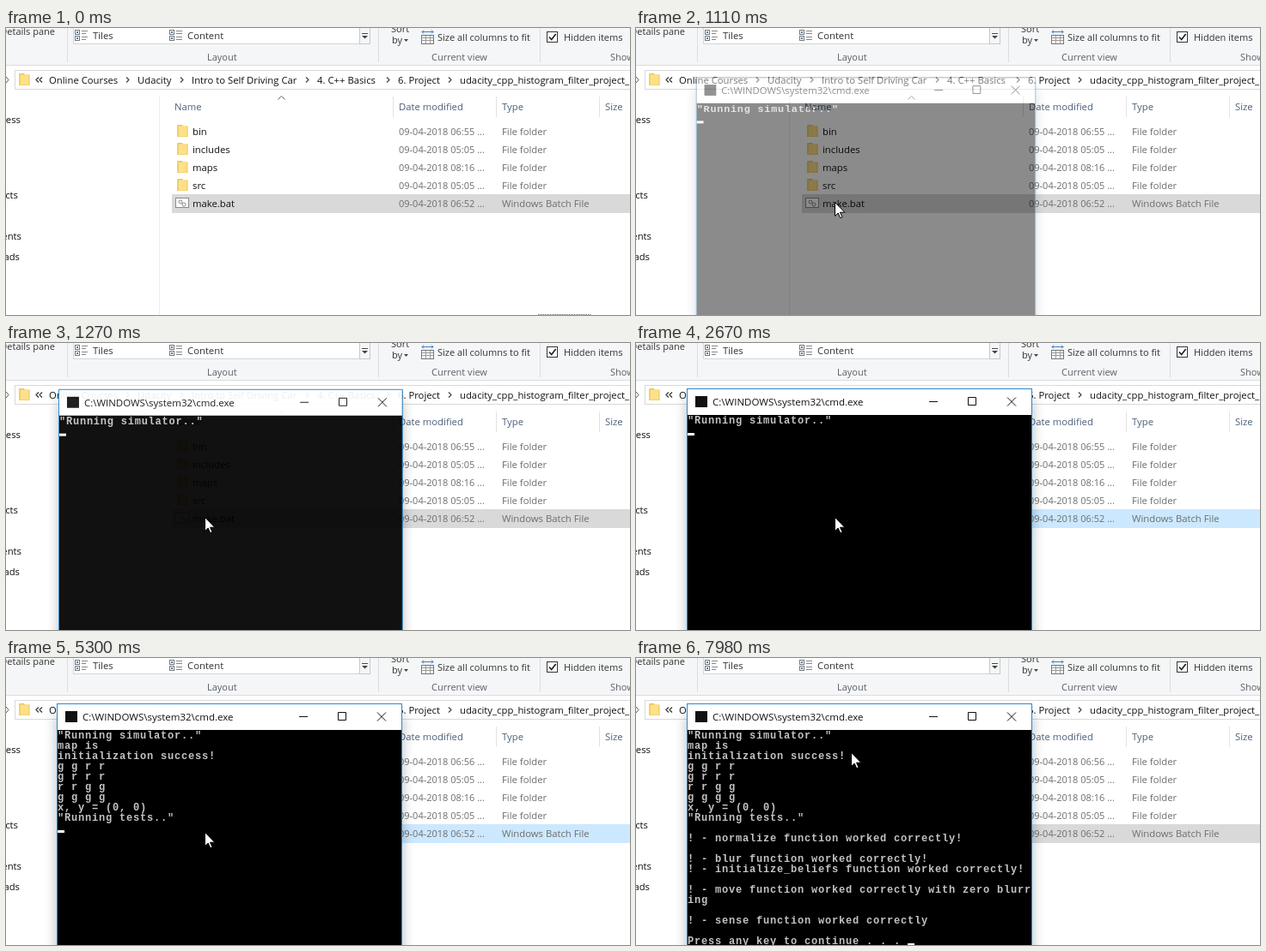
Recreate the animation shown at these times as an HTML page. Size 726 px wide and 335 px high, loop 8000 ms.

```html
<!DOCTYPE html>
<html lang="en">
<head>
<meta charset="utf-8">
<title>Batch run</title>
<style>
html, body { margin: 0; width: 100%; height: 100%; overflow: hidden; background: #fff; }
svg { display: block; width: 726px; height: 335px; }
text { font: 11.3px "Open Sans", "Noto Sans", sans-serif; white-space: pre; }
.ribbon { font-size: 11px; }
.date { font-size: 11px; }
.title { font-size: 11.5px; }
.con { font: bold 12px "Liberation Mono", "DejaVu Sans Mono", monospace; letter-spacing: .8px; fill: #c4c4c4; }
</style>
</head>
<body>
<svg id="stage" viewBox="0 0 726 335" xmlns="http://www.w3.org/2000/svg">
  <defs>
    <filter id="soft" x="-20%" y="-20%" width="140%" height="140%"><feGaussianBlur stdDeviation="7"/></filter>
    <g id="folder">
      <path d="M0 1h6l1 1.5h5.5V15H0z" fill="#e8c456"/>
      <path d="M1 2.5h10.5V14.5H1z" fill="#fde08a"/>
      <path d="M0 1h2v14H0z" fill="#f3cf63"/>
    </g>
  </defs>
  <rect width="726" height="335" fill="#fff"/>
  <g id="explorer"></g>
  <path id="ghost" d="M619 334.5h61" stroke="#555" stroke-dasharray="1 1" fill="none"/>
  <g id="win"></g>
  <path id="mouse" d="M.5.5V16.5L4.2 13 6.7 18.7 9 17.7 6.5 12.2H11.8Z" fill="#fff" stroke="#000" stroke-width="1"/>
</svg>
<script>
const NS = 'http://www.w3.org/2000/svg';
const LOOP = 8000;
const $ = id => document.getElementById(id);
const explorer = $('explorer'), win = $('win');

function add(parent, tag, attrs, content) {
  const el = document.createElementNS(NS, tag);
  for (const k in attrs) el.setAttribute(k, attrs[k]);
  if (content !== undefined) el.textContent = content;
  parent.appendChild(el);
  return el;
}
const text = (parent, x, y, str, fill = '#111', cls = '', anchor = 'start') =>
  add(parent, 'text', { x, y, fill, class: cls, 'text-anchor': anchor }, str);
const rect = (parent, x, y, width, height, fill, stroke = 'none') =>
  add(parent, 'rect', { x, y, width, height, fill, stroke });
const line = (parent, d, stroke, width = 1) =>
  add(parent, 'path', { d, stroke, 'stroke-width': width, fill: 'none' });
const folder = (x, y) => add(explorer, 'use', { href: '#folder', x, y });

function drawRibbon() {
  const g = explorer, ink = '#333', label = '#5a5f66';
  rect(g, 0, 0, 726, 43, '#f5f6f7');
  line(g, 'M0 43.5H726', '#dadbdc');
  line(g, 'M71.5 0V40M433.5 0V40M621.5 0V40', '#dcdddf');
  rect(g, 78.5, -2.5, 345, 21, '#fff', '#d3d5d8');
  rect(g, 411.5, -2.5, 12, 21, '#f5f6f7', '#c6c8cb');
  line(g, 'M414 6.5h7', '#444');
  add(g, 'path', { d: 'M414 9h7l-3.5 3.5z', fill: '#444' });

  for (const y of [3, 10]) {
    rect(g, 80.5, y - .5, 5, 5, '#fff', '#777');
    rect(g, 82, y + 1, 2, 2, '#3d7fc1');
    line(g, `M88 ${y + .5}h7M88 ${y + 3.5}h5`, '#888');
    rect(g, 190.5, y - .5, 5, 5, '#fff', '#777');
    rect(g, 192, y + 1, 2, 2, '#3d7fc1');
    line(g, `M198 ${y + .5}h7M198 ${y + 3.5}h7`, '#888');
  }
  text(g, 57, 8, 'Details pane', ink, 'ribbon', 'end');
  text(g, 101, 13, 'Tiles', ink);
  text(g, 211, 13, 'Content', ink);
  text(g, 234, 38, 'Layout', label, 'ribbon');
  text(g, 448, 5, 'Sort', ink, 'ribbon');
  text(g, 449, 18, 'by', ink, 'ribbon');
  add(g, 'path', { d: 'M463 13h5l-2.5 3z', fill: '#444' });

  rect(g, 483.5, 8.5, 14, 10, '#fff', '#777');
  line(g, 'M488.5 9v9M493.5 9v9M484 11.5h13M484 14.5h13', '#999');
  line(g, 'M484 4.5h13M486 2.5l-2 2 2 2M495 2.5l2 2-2 2', '#3d7fc1');
  text(g, 502, 15, 'Size all columns to fit', ink, 'ribbon');
  text(g, 495, 38, 'Current view', label, 'ribbon');

  rect(g, 629.5, 4.5, 12, 12, '#fff', '#333');
  line(g, 'M632 10.5l2.7 3 5-6.5', '#222', 1.7);
  text(g, 649, 15, 'Hidden items', ink, 'ribbon');
  text(g, 703, 38, 'Show/hide', label, 'ribbon');
}

function drawAddress() {
  rect(explorer, 10.5, 49.5, 740, 22, '#fff', '#d9d9d9');
  line(explorer, 'M0 57l3 3.5-3 3.5', '#555');
  folder(15, 52);
  line(explorer, 'M38 57.5l-3 3 3 3M42 57.5l-3 3 3 3', '#333', 1.2);
  const path = [[50, 'Online Courses'], [153, 'Udacity'], [216, 'Intro to Self Driving Car'],
    [362, '4. C++ Basics'], [456, '6. Project'], [528, 'udacity_cpp_histogram_filter_project_master']];
  path.forEach(([x, name], i) => {
    text(explorer, x, 65, name);
    if (i) line(explorer, `M${x - 13} 57.5l3 3-3 3`, '#444', 1.2);
  });
}

function drawSide() {
  line(explorer, 'M178.5 80V335', '#ececec');
  [[17, 111, 'Quick access'], [14, 199, '3D Objects'], [18, 247, 'Documents'], [16, 271, 'Downloads']]
    .forEach(([x, y, s]) => text(explorer, x, y, s, '#111', '', 'end'));
}

function drawList() {
  const head = '#4c607a';
  line(explorer, 'M316.5 83.5l4-4 4 4', '#666');
  line(explorer, 'M450.5 80V104M570.5 80V104M690.5 80V104', '#e2e2e2');
  [[196, 'Name'], [457, 'Date modified'], [577, 'Type'], [697, 'Size']]
    .forEach(([x, s]) => text(explorer, x, 96, s, head));
  const row = rect(explorer, 193, 194, 533, 22, '#d9d9d9');
  const files = [['bin', '06:55'], ['includes', '05:05'], ['maps', '08:16'], ['src', '05:05'], ['make.bat', '06:52']];
  const dates = files.map(([name, time], i) => {
    const y = 125 + 21 * i, batch = i === 4;
    if (!batch) folder(199, y - 13);
    text(explorer, 217, y, name);
    text(explorer, 577, y, batch ? 'Windows Batch File' : 'File folder', '#6d6d6d');
    return text(explorer, 457, y, `09-04-2018 ${time} ...`, '#6d6d6d', 'date');
  });
  rect(explorer, 197.5, 198.5, 15, 11, '#fff', '#8a8a8a');
  for (const [x, y] of [[203, 203], [207, 206]])
    add(explorer, 'circle', { cx: x, cy: y, r: 2, fill: 'none', stroke: '#888' });
  return { row, date: dates[0] };
}

function drawConsole() {
  add(win, 'rect', { x: 58, y: 66, width: 404, height: 400, fill: '#000', opacity: .25, filter: 'url(#soft)' });
  rect(win, 59.5, 53.5, 401, 420, '#000', '#2b8ad0');
  rect(win, 60, 54, 400, 30, '#fff');
  rect(win, 69, 62, 14, 13, '#111');
  text(win, 89, 73, 'C:\\WINDOWS\\system32\\cmd.exe', '#111', 'title');
  line(win, 'M341 68.5h10M386.5 63.5h9v9h-9zM432 63.5l10 10M442 63.5l-10 10', '#111');
  const group = (start, lines) => {
    const g = add(win, 'g', {});
    lines.forEach((s, i) => s && text(g, 60, 94 + 12 * (start + i), s, '#c4c4c4', 'con'));
    return g;
  };
  group(0, ['"Running simulator.."']);
  const sim = group(1, ['map is', 'initialization success!', 'g g r r', 'g r r r', 'r r g g',
    'g g g g', 'x, y = (0, 0)', '"Running tests.."']);
  const tests = group(10, ['! - normalize function worked correctly!', '',
    '! - blur function worked correctly!', '! - initialize_beliefs function worked correctly!', '',
    '! - move function worked correctly with zero blurr', 'ing', '',
    '! - sense function worked correctly', '', 'Press any key to continue . . . ']);
  return { sim, tests, caret: rect(win, 60, 105, 8, 3, '#fff') };
}

drawRibbon();
drawAddress();
drawSide();
const list = drawList();
const con = drawConsole();

const show = (el, on) => el.setAttribute('visibility', on ? 'visible' : 'hidden');
const blinks = [2120, 2670, 3220, 3690, 4770, 5300, 5850, 6330, 6880, 7740];
// start time, scale, opacity of the opening window
const opening = [[1110, .984, .45], [1190, .9925, .8], [1270, .997, .93], [1340, 1, 1]];

function mousePos(t) {
  if (t < 810) {
    const p = (Math.floor((t - 70) / 74) + 1) / 11;
    const e = 1 - (1 - p) ** 2;
    return [648 - 417 * e, 338 - 135 * p ** .8];
  }
  if (t < 7740) return [231, 203];
  const p = Math.min(1, (Math.floor((t - 7740) / 80) + 1) / 4);
  return [231 + 19 * p, 203 - 93 * p];
}

function render(t) {
  show($('ghost'), t < 70);
  show($('mouse'), t >= 70);
  const [mx, my] = mousePos(t).map(Math.round);
  $('mouse').setAttribute('transform', `translate(${mx} ${my})`);

  const hover = (t >= 70 && t < 960 && my < 216) || (t >= 1340 && t < 7740);
  list.row.setAttribute('fill', hover ? '#cce8ff' : '#d9d9d9');
  list.date.textContent = `09-04-2018 06:${t < 5070 ? 55 : 56} ...`;

  const pose = opening.filter(o => t >= o[0]).pop();
  win.setAttribute('display', pose ? 'inline' : 'none');
  if (!pose) return hideConsole();
  const [, s, alpha] = pose;
  win.setAttribute('transform', `translate(727 320) scale(${s}) translate(-727 -320)`);
  win.setAttribute('opacity', alpha);

  show(con.sim, t >= 4160);
  show(con.tests, t >= 7200);
  const cell = t < 4160 ? [0, 1] : t < 7200 ? [0, 9] : [32, 20];
  con.caret.setAttribute('x', 60 + 8 * cell[0]);
  con.caret.setAttribute('y', 93 + 12 * cell[1]);
  show(con.caret, blinks.filter(b => t >= b).length % 2 === 0);
}

function hideConsole() {
  [con.sim, con.tests, con.caret].forEach(el => show(el, false));
}

const begin = performance.now();
function tick() {
  render((performance.now() - begin) % LOOP);
  requestAnimationFrame(tick);
}
tick();
</script>
</body>
</html>
```
